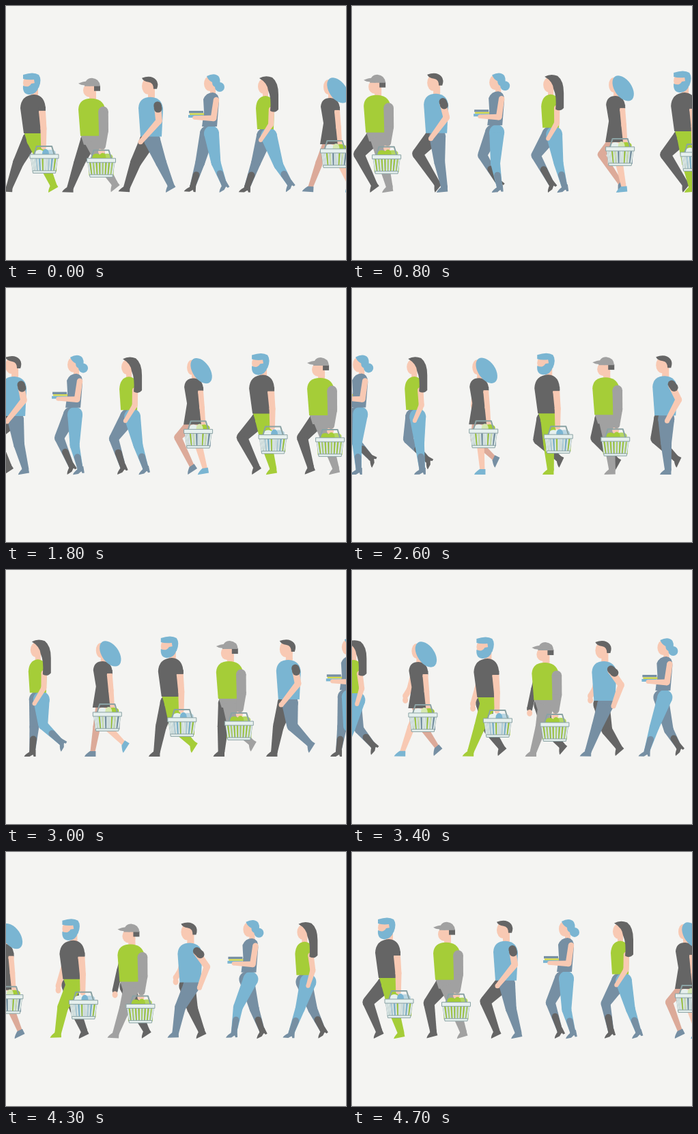
Write an HTML page with a canvas that moves like this. It is 498 px wide and 373 px high and loops after 4.8 s.

```html
<!DOCTYPE html>
<html lang="en">
<head>
<meta charset="utf-8">
<title>Walking shoppers</title>
<style>
html, body { margin: 0; width: 100%; height: 100%; overflow: hidden; background: #f4f4f2; }
canvas { display: block; width: 498px; height: 373px; }
</style>
</head>
<body>
<canvas id="stage"></canvas>
<script>
const W = 498, H = 373, LOOP = 4800, STEP = 100, CYCLE = 960;
const SPEED = 522 / 4700, SPAN = 535;
const DARK = '#656565', GREEN = '#a5cd38', GRAY = '#a1a1a1', BLUE = '#7ab5d2',
      SLATE = '#768fa3', SKIN = '#f8c9b3', SHADE = '#dcaa99', STEEL = '#8aa2a4', PALE = '#e6f0ee';

const canvas = document.getElementById('stage');
const ctx = canvas.getContext('2d');
const dpr = window.devicePixelRatio || 1;
canvas.width = W * dpr;
canvas.height = H * dpr;

// One leg over a full stride: phase, knee x/y, ankle x/y, toe-down angle
const STRIDE = [
  [0, -16, 230, -29, 266, -3],
  [.06, -14, 231, -27, 267, 0],
  [.21, -2, 230, 1, 267, 0],
  [.333, 1, 232, 8, 266, 5],
  [.4, 4, 232, 15, 265, 12],
  [.5, 11, 230, 25, 262, 30],
  [.54, 10, 235, 27, 260, 40],
  [.6, 4, 232, 28, 256, 55],
  [.708, -7, 224, 22, 250, 65],
  [.833, -21, 220, 7, 260, 50],
  [.885, -24, 221, -5, 262, 30],
  [.94, -22, 224, -18, 264, 12],
  [1, -16, 230, -29, 266, -3]
];

function strideAt(q) {
  q -= Math.floor(q);
  const i = STRIDE.findIndex(row => row[0] > q);
  const a = STRIDE[i - 1], b = STRIDE[i];
  const k = (q - a[0]) / (b[0] - a[0]);
  return a.slice(1).map((v, j) => v + (b[j + 1] - v) * k);
}

function shape(d, color) {
  ctx.fillStyle = color;
  ctx.fill(new Path2D(d));
}

function oval(x, y, rx, ry, color, turn = 0) {
  ctx.fillStyle = color;
  ctx.beginPath();
  ctx.ellipse(x, y, rx, ry, turn, 0, 7);
  ctx.fill();
}

function box(x, y, w, h, color) {
  ctx.fillStyle = color;
  ctx.fillRect(x, y, w, h);
}

// Tapered limb through joints [x, y, radius]
function limb(color, ...joints) {
  joints.forEach(([x, y, r], i) => {
    oval(x, y, r, r, color);
    if (!i) return;
    const [px, py, pr] = joints[i - 1];
    const len = Math.hypot(x - px, y - py) || 1;
    const nx = (py - y) / len, ny = (x - px) / len;
    ctx.beginPath();
    ctx.moveTo(px + nx * pr, py + ny * pr);
    ctx.lineTo(x + nx * r, y + ny * r);
    ctx.lineTo(x - nx * r, y - ny * r);
    ctx.lineTo(px - nx * pr, py - ny * pr);
    ctx.fill();
  });
}

function leg(p, q, side, lift, color, shoe) {
  const [kx, ky, ax, ay, tilt] = strideAt(q);
  const [r1, r2, r3] = p.girth;
  const off = (p.dx || 0) + side * p.hip, amp = p.amp || 1;
  const knee = [kx * amp + off, ky - lift * .6, r2];
  const ankle = [ax * amp + off, ay, r3];
  limb(color, [side * 3 + (p.dx || 0) * .4, p.hipY - lift, r1], knee, ankle);
  if (p.boots) {
    const mix = (a, b) => a + (b - a) * .5;
    limb(shoe, [mix(knee[0], ankle[0]), mix(knee[1], ankle[1]), r3 + .8], ankle);
  }
  ctx.save();
  ctx.translate(ankle[0], ankle[1]);
  ctx.rotate(-tilt * Math.PI / 180);
  shape(p.boots ? 'M5 -3V7H2L1 4L-4 7H-12Q-11 4 -4 0Z' : 'M4.5 -1V7H-12Q-11 4 -4 -1Z', shoe);
  ctx.restore();
}

function basket(x, y, colors) {
  ctx.save();
  ctx.translate(x, y);
  ctx.lineJoin = 'round';
  oval(-7, -1, 7, 6, colors[0]);
  oval(9, -2, 8, 5, colors[1]);
  oval(2, -1, 5, 7, colors[2]);
  ctx.strokeStyle = STEEL;
  ctx.lineWidth = 2;
  ctx.stroke(new Path2D('M-15 1L-11 -12H11L15 1'));
  for (let i = 0; i < 8; i++) box(-18 + i * 4.5, 5, 4.6, 20, colors[i % colors.length]);
  const slats = new Path2D();
  for (let i = -4; i <= 4; i++) {
    slats.moveTo(i * 4.7, 5);
    slats.lineTo(i * 3.9, 26);
  }
  ctx.lineWidth = 2.6;
  ctx.stroke(slats);
  ctx.strokeStyle = PALE;
  ctx.lineWidth = 1.7;
  ctx.stroke(slats);
  ctx.fillStyle = PALE;
  ctx.strokeStyle = STEEL;
  ctx.lineWidth = 1;
  for (const part of ['M-21 0H21V6H-21Z', 'M-17 24H17L16.5 27.5H-16.5Z']) {
    const path = new Path2D(part);
    ctx.fill(path);
    ctx.stroke(path);
  }
  ctx.restore();
}

function farArm(s, color, handY) {
  const reach = (1 - s) ** 2;
  limb(color, [-5, 147, 5], [-4 - 9 * reach, 175, 4.5], [2 - 22 * reach, handY - 6, 4]);
  oval(2 - 22 * reach, handY, 4, 5, SKIN);
}

const MAN = [12, 8, 4.8], WOMAN = [12, 7, 4.2];

// s is the arm swing: 1 with the far leg in front, 0 with the near leg in front
const people = [
  {
    x: 39, hip: 5, hipY: 196, girth: MAN, bob: 3.5, far: DARK, near: GREEN, block: 'M-13 184H14L13 200H-8Z',
    back: s => farArm(s, SKIN, 203),
    front() {
      limb(SKIN, [3, 120, 5], [3, 131, 5]);
      shape('M-18 150Q-17 131 2 130Q19 131 19 153L13 154L14 187H-13Z', DARK);
      oval(-6, 113, 8, 10, SKIN);
      oval(5, 112, 5, 6, SKIN);
      shape('M-14 101Q1 96 9 101Q14 108 9 120L4 120L2 108Q-8 109 -14 107Z', BLUE);
      shape('M-14 117Q-6 121 -2 114L4 113L9 119Q5 131 -6 130Q-15 129 -14 117Z', BLUE);
      limb(SKIN, [14, 155, 5], [16, 180, 4.5], [16, 207, 3.8]);
      box(8.5, 148, 10.5, 6, DARK);
      basket(17, 218, [PALE, '#b9d6e2', BLUE, GREEN]);
    }
  },
  {
    x: 122, dx: 5, hip: 5, hipY: 198, girth: MAN, bob: 6, lead: .035, far: DARK, near: GRAY, block: 'M-13 188H15L15 204H-8Z',
    back: s => farArm(s, DARK, 210),
    front() {
      limb(SKIN, [5, 127, 5], [5, 136, 5]);
      shape('M-16 152Q-15 136 3 136Q19 136 23 150L15 191H-13Z', GREEN);
      oval(0, 124, 9, 10, SKIN);
      box(7, 117, 9, 8, DARK);
      shape('M-7 118Q-6 106 4 106Q15 107 16 118Z', GRAY);
      shape('M-16 114Q-9 111 -5 111L2 118L-12 116Z', GRAY);
      oval(18, 214, 5, 5, SKIN);
      limb(GRAY, [20.5, 155, 7.3], [21, 183, 7], [19, 206, 5]);
      basket(17.5, 224, [GREEN, '#b4d764', GREEN]);
    }
  },
  {
    x: 211, hip: 5, hipY: 197, girth: MAN, bob: 6, far: DARK, near: SLATE,
    back: s => farArm(s, SKIN, 191),
    front(s) {
      const ex = 26 - 13 * s;
      limb(SKIN, [2, 122, 5], [2, 134, 5]);
      shape('M-17 150Q-16 134 1 134Q18 135 19 152L17 192H-14Z', BLUE);
      oval(-3, 118, 9, 12, SKIN);
      shape('M-12 106Q2 101 9 109Q13 114 10 122L5 122Q5 113 -2 112Q-10 111 -12 106Z', DARK);
      limb(SKIN, [11, 148, 5], [ex, 169, 4.8], [15 - 29 * s, 200, 3.5]);
      limb(DARK, [11, 146, 5.6], [11 + (ex - 11) * .35, 151, 5.8]);
    }
  },
  {
    x: 298, hip: 0, hipY: 187, girth: [11, 7, 4], amp: .86, bob: 2, boots: true, far: SLATE, near: BLUE, farShoe: DARK, shoe: SLATE,
    front() {
      limb(SKIN, [5, 117, 4], [5, 128, 4]);
      shape('M-9 137Q-5 127 5 127Q14 128 14 140L11 177H-11L-8 155Z', SLATE);
      oval(0, 114, 8, 11, SKIN);
      oval(15, 119, 7, 7, BLUE);
      shape('M-4 103Q8 97 14 104Q18 112 12 119Q4 120 4 112Q-2 109 -4 103Z', BLUE);
      box(-30, 154, 21, 3.5, SLATE);
      box(-29, 157.5, 21, 2.5, '#d6d94a');
      box(-31, 160, 22, 4, BLUE);
      limb(SKIN, [10, 138, 4.2], [6, 165, 4.4], [-22, 164, 2.8]);
    }
  },
  {
    x: 380, dx: 5, hip: 4, hipY: 191, girth: WOMAN, bob: 2.5, lead: .03, boots: true, far: SLATE, near: BLUE, farShoe: DARK, shoe: SLATE,
    front(s) {
      limb(SKIN, [0, 121, 4], [0, 133, 4]);
      shape('M-14 150Q-13 133 0 132Q12 133 13 148L12 181H-12Z', GREEN);
      oval(-3, 118, 8, 11, SKIN);
      limb(SKIN, [9, 152, 4.2], [12 - 4 * s, 174, 4], [5 - 12 * s, 197, 3]);
      shape('M-9 106Q0 101 10 105Q19 112 19 130V152Q14 158 7 154Q9 135 4 124Q3 113 -9 106Z', DARK);
    }
  },
  {
    x: 475, dx: 2, hip: 2, hipY: 200, girth: [8, 5.5, 3.5], bob: 3.5, far: SHADE, near: SKIN, farShoe: SLATE, shoe: BLUE,
    back: s => farArm(s, SKIN, 191),
    front() {
      limb(SKIN, [1, 123, 4], [1, 135, 4]);
      shape('M-14 148Q-13 135 0 135Q14 136 14 153L11 172L17 203H-15L-10 172Z', DARK);
      oval(-3, 119, 7, 11, SKIN);
      oval(11, 124, 12.5, 21, BLUE, -.6);
      limb(SKIN, [10, 155, 4], [12, 178, 3.8], [14, 203, 3.2]);
      box(6, 148, 8, 5, DARK);
      basket(6.5, 210, [PALE, GREEN, '#d5e8b0', SLATE]);
    }
  }
];

function drawPerson(p, x, phase) {
  const ph = phase + (p.lead || 0);
  const s = (1 + Math.cos(2 * Math.PI * phase)) / 2;
  const lift = p.bob * (1 - Math.cos(4 * Math.PI * (phase - .03))) / 2;
  const raised = draw => {
    if (!draw) return;
    ctx.save();
    ctx.translate(0, -lift);
    draw(s);
    ctx.restore();
  };
  ctx.save();
  ctx.translate(x, 0);
  raised(p.back);
  leg(p, ph, -1, lift, p.far, p.farShoe || p.far);
  if (p.block) raised(() => shape(p.block, p.near));
  leg(p, ph + .5, 1, lift, p.near, p.shoe || p.near);
  raised(p.front);
  ctx.restore();
}

function render(t) {
  ctx.setTransform(dpr, 0, 0, dpr, 0, 0);
  box(0, 0, W, H, '#f4f4f2');
  const phase = t / CYCLE % 1;
  for (const p of people) {
    const x = p.x - t * SPEED;
    for (const at of [x, x + SPAN]) {
      if (at > -60 && at < W + 60) drawPerson(p, at, phase);
    }
  }
}

const start = performance.now();
function tick() {
  const t = (performance.now() - start) % LOOP;
  render(Math.floor(t / STEP) * STEP);
  requestAnimationFrame(tick);
}
tick();
</script>
</body>
</html>
```
